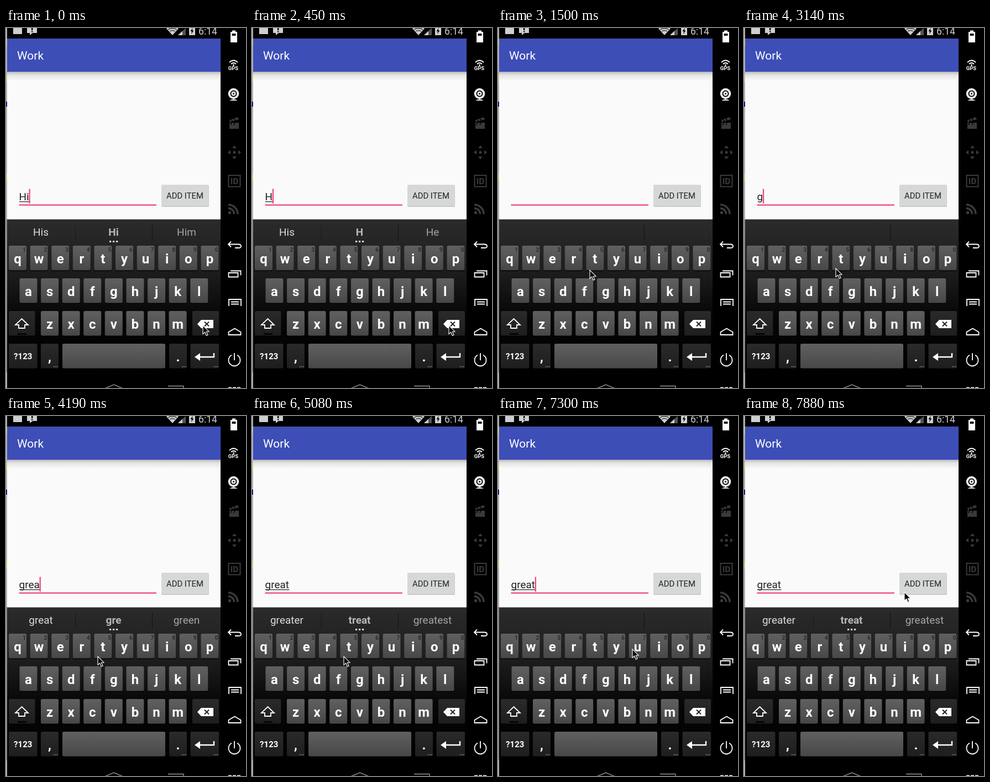
Animation, 434 px wide and 650 px high, one loop 8 s. Source, as an HTML page:

```html
<!DOCTYPE html>
<html lang="en">
<head>
<meta charset="utf-8">
<title>Phone keyboard</title>
<style>
  html, body { margin: 0; width: 100%; height: 100%; overflow: hidden; background: #000; }
  svg { display: block; width: 434px; height: 650px; }
  text { font-family: Roboto, sans-serif; }
  .mid { text-anchor: middle; }
  .bold { font-weight: 700; }
  .line { fill: none; stroke: #fff; stroke-width: 1.8; }
  .dim { fill: #3a3a3a; }
</style>
</head>
<body>
<svg viewBox="0 0 434 650">
  <defs>
    <linearGradient id="shade" x2="0" y2="1">
      <stop stop-color="#b9b9b9"/><stop offset=".35" stop-color="#e3e3e3"/><stop offset="1" stop-color="#fafafa"/>
    </linearGradient>
    <linearGradient id="board" x2="0" y2="1">
      <stop stop-color="#2b2b2b"/><stop offset=".35" stop-color="#1c1c1c"/><stop offset=".62" stop-color="#060606"/><stop offset="1" stop-color="#000"/>
    </linearGradient>
    <linearGradient id="light" x2="0" y2="1">
      <stop stop-color="#606060"/><stop offset=".5" stop-color="#545454"/><stop offset="1" stop-color="#474747"/>
    </linearGradient>
    <linearGradient id="dark" x2="0" y2="1">
      <stop stop-color="#2a2a2a"/><stop offset="1" stop-color="#1e1e1e"/>
    </linearGradient>
  </defs>

  <rect width="434" height="650"/>
  <g id="desktop">
    <rect width="2" height="650" fill="#b4b4b4"/>
    <path d="M0 19h2v14h-2zM0 84h2v14h-2zM0 262h2v14h-2z" fill="#c9c98c"/>
    <rect y="133" width="2" height="9" fill="#10108a"/>
    <rect y="345" width="2" height="277" fill="#8e8e8e"/>
  </g>

  <g id="status" fill="#cfcfcf">
    <rect x="2" width="386" height="19" fill="#000"/>
    <rect x="13" y="-5" width="16" height="16"/>
    <path d="M38 0H56V9H48L43 13V9H38Z"/>
    <path d="M46 0h2.4v4h-2.4zM46 5.5h2.4v2h-2.4z" fill="#000"/>
    <path d="M290 1Q301-6 312 1L301 13Z"/>
    <path d="M293 3Q301-2 309 3M296 6Q301 3 306 6" fill="none" stroke="#333" stroke-width="1.3"/>
    <path d="M311 13L325 0V13Z" fill="#555"/><path d="M311 13L319 5.5V13Z"/>
    <rect x="331" y="-3" width="11" height="16"/>
    <path d="M337.500 0L333.500 6H336L335 11L339.500 4.500H337Z" fill="#000"/>
    <text x="348" y="12" font-size="17.6">6:14</text>
  </g>

  <g id="app">
    <rect x="2" y="79" width="386" height="267" fill="#fafafa"/>
    <rect x="2" y="79" width="386" height="16" fill="url(#shade)"/>
    <rect x="2" y="19" width="386" height="60" fill="#3d4eb7"/>
    <text x="20" y="57" font-size="21" fill="#fff">Work</text>
    <rect x="281" y="284" width="86" height="39" rx="2" fill="#c4c5c5"/>
    <rect x="281" y="283" width="85.500" height="38.500" rx="2" fill="#d6d7d7"/>
    <text class="mid" x="323.500" y="308" font-size="14.9" fill="#222">ADD ITEM</text>
    <rect x="23.500" y="318.500" width="248.500" height="2.200" fill="#f0407f"/>
    <text id="entry" x="23.500" y="311" font-size="19" fill="#222"></text>
    <rect id="composing" x="24" y="313" height="1.200" fill="#222"/>
    <rect id="caret" width="2.200" fill="#f0407f"/>
  </g>

  <g id="keyboard">
    <rect x="2" y="345.500" width="386" height="283" fill="url(#board)"/>
    <path d="M264.500 356V384" stroke="#111"/>
    <path id="divider" d="M125.500 356V384" stroke="#191919"/>
    <g font-size="19" class="mid">
      <text class="hint" x="63" y="375" fill="#dcdcdc"></text>
      <text class="hint bold" x="194.500" y="375" fill="#b8b8b8"></text>
      <text class="hint" x="326.500" y="375" fill="#a6a6a6"></text>
    </g>
    <path id="more" d="M187 384h3.200v3h-3.200zM193 384h3.200v3h-3.200zM199 384h3.200v3h-3.200z" fill="#ddd"/>
    <g id="keys"></g>
    <g id="marks">
      <path class="line" d="M28.500 525L40 536H34V542H23V536H17Z"/>
      <path d="M21 552.500H37" stroke="#000" stroke-width="2.500"/>
      <path d="M346 534.500L353 527H375V542H353Z" fill="#fff"/>
      <path d="M359 530.500L367 538.500M367 530.500L359 538.500" stroke="#222" stroke-width="2"/>
      <path d="M376 587V594H349" fill="none" stroke="#fff" stroke-width="2.400"/>
      <path d="M341 594L351 587V601Z" fill="#fff"/>
    </g>
    <g class="line" style="stroke:#777">
      <path d="M176 652L195 644L214 652"/><path d="M293 646.500H321V652"/>
    </g>
  </g>

  <g id="tools">
    <rect x="388" width="46" height="650" fill="#000"/>
    <path d="M409 4.500H415V7H418V26H406V7H409Z" fill="#fff"/>
    <path d="M408.500 10H415.500V14H408.500Z" fill="#111"/>
    <path class="line" d="M404 62Q411.500 55 419 62M407 65Q411.500 61 416 65"/>
    <circle cx="411.500" cy="67" r="1.500" fill="#fff"/>
    <text class="mid bold" x="411" y="75.500" font-size="9.500" fill="#fff">GPS</text>
    <circle cx="411.500" cy="118.500" r="9.700" fill="#fff"/>
    <circle cx="411.500" cy="118.500" r="5" fill="none" stroke="#000" stroke-width="2"/>
    <circle cx="411.500" cy="118.500" r="1.600"/>
    <path d="M404 131Q411.500 126 419 131Z" fill="#fff"/>
    <g class="dim">
      <path d="M404 171H421V182H404ZM404 166L419 161L421 165L405 170Z"/>
      <path d="M407 165l3 4M412 163.500l3 4M408 171l-2 4M414 171l-2 4" stroke="#000" stroke-width="1.500"/>
      <path d="M413 212L417 217H409ZM413 237L417 232H409ZM401 224.500L406 220.500V228.500ZM425 224.500L420 220.500V228.500Z"/>
      <circle cx="413" cy="224.500" r="2.500"/>
      <rect x="402.500" y="266" width="21" height="20.500" fill="none" stroke="#3a3a3a" stroke-width="2"/>
      <text class="mid bold" x="413" y="282" font-size="15.500">ID</text>
      <circle cx="404.500" cy="333.500" r="2.700"/>
      <path d="M402 325.500A10.500 10.500 0 0 1 412.500 336M402 319A17 17 0 0 1 419 336" fill="none" stroke="#3a3a3a" stroke-width="3.600"/>
    </g>
    <g class="line">
      <path d="M407 385.500L402 390.500L407 395.500M402 390.500H420Q425 390.500 425 394T420 397H414"/>
      <path d="M402.500 442H419.500V449.500H402.500ZM406 438.500H424.500V446.500"/>
      <path d="M403 502V490H425V502M407 494.500H421M407 498.500H421"/>
      <path d="M402.500 554V549L413.500 542.500L424.500 549V554Z"/>
      <path d="M408 590.500A10.500 10.500 0 1 0 418 590.500M413 587V600"/>
    </g>
    <path d="M402 648.500h6v2h-6zM410 648.500h6v2h-6zM418 648.500h6v2h-6z" fill="#fff"/>
  </g>

  <path id="pointer" d="M0 0V15.500L3.700 12.200L6.300 18.300L9 17.200L6.400 11.200H11Z" fill="#0a0a0a" stroke="#fff" stroke-width="1.100"/>
</svg>

<script>
const $ = id => document.getElementById(id);
const LOOP = 8000;

// Keys: [label, x, width, dark?, hint]
function addKey(label, x, y, width, dark, size = 24, corner = '') {
  const fill = dark ? 'dark' : 'light';
  const mid = x + width / 2;
  const baseline = y + (size < 20 ? 28 : 32);
  const small = corner === '…'
    ? `<path d="M${x + width - 9} ${y + 41.500}h8" stroke="#999" stroke-width="1.500" stroke-dasharray="1.500"/>`
    : `<text class="mid bold" x="${x + width - 4}" y="${y + 11}" font-size="10.500" fill="#2c2c2c">${corner}</text>`;
  $('keys').insertAdjacentHTML('beforeend',
    `<rect x="${x}" y="${y + 1}" width="${width}" height="45" rx="2.500" fill="#000"/>
     <rect class="face" x="${x}" y="${y}" width="${width}" height="44.500" rx="2.500" fill="url(#${fill})"/>
     ${small}<text class="mid bold" x="${mid}" y="${baseline}" font-size="${size}" fill="#fff">${label}</text>`);
  return $('keys').querySelector('.face:last-of-type') && [...$('keys').querySelectorAll('.face')].pop();
}

function addRow(letters, x, y, numbered) {
  [...letters].forEach((c, i) =>
    addKey(c, x + i * 38.600, y, 32, false, 24, numbered ? String((i + 1) % 10) : ''));
}

addRow('qwertyuiop', 5, 393, true);
addRow('asdfghjkl', 24.500, 452);
addRow('zxcvbnm', 63, 511);
addKey('', 5, 511, 47.500, true);
const deleteKey = addKey('', 337, 511, 48, true);
addKey('?123', 5, 570, 51.500, true, 15);
addKey(',', 63, 570, 32, true, 24, '…');
addKey('', 102, 570, 186, false);
addKey('.', 295, 570, 32, true, 24, '…');
addKey('', 333.500, 570, 51.500, true, 24, '…');

// Each step lists only what changes from its time on.
const none = ['', '', ''];
const great = ['greater', 'treat', 'greatest'];
const steps = [
  [0, { text: 'Hi', hints: ['His', 'Hi', 'Him'], caret: 1, composing: 1, wrapped: 0, pressed: 0, at: [356, 537] }],
  [150, { text: 'H', pressed: 1 }],
  [300, { pressed: 0 }],
  [450, { hints: ['His', 'H', 'He'] }],
  [750, { text: '', pressed: 1 }],
  [900, { hints: none, pressed: 0 }],
  [1200, { at: [282, 484] }],
  [1350, { at: [182, 444], caret: 0 }],
  [1500, { at: [166, 437] }],
  [1650, { at: [166, 434] }],
  [1800, { caret: 1 }],
  [2400, { caret: 0 }],
  [2850, { caret: 1 }],
  [3140, { text: 'g', composing: 0 }],
  [3290, { text: 'gr', composing: 1 }],
  [3440, { hints: ['great', 'gr', 'green'] }],
  [3590, { text: 'gre', hints: ['great', 'gre', 'green'] }],
  [4190, { text: 'grea' }],
  [4340, { hints: ['great', 'grea', 'greater'] }],
  [4480, { text: 'great', hints: great }],
  [5080, { caret: 0 }],
  [5530, { caret: 1 }],
  [5670, { wrapped: 1, composing: 0, hints: none }],
  [6270, { caret: 0 }],
  [6410, { at: [205, 434] }],
  [6560, { at: [246, 431] }],
  [6710, { at: [243, 421], caret: 1 }],
  [7150, { caret: 0 }],
  [7300, { wrapped: 0, composing: 1, caret: 1 }],
  [7440, { hints: great, at: [251, 392] }],
  [7590, { at: [270, 350] }],
  [7730, { at: [286, 325] }],
  [7880, { at: [290, 318], caret: 0 }]
];

const hintTexts = document.querySelectorAll('.hint');
const set = (el, attrs) => Object.entries(attrs).forEach(([k, v]) => el.setAttribute(k, v));
const show = (el, on) => el.setAttribute('visibility', on ? 'visible' : 'hidden');

function render(time) {
  const s = Object.assign({}, ...steps.filter(([t]) => t <= time).map(([, change]) => change));
  const entry = $('entry');
  entry.textContent = s.text;
  entry.setAttribute('y', s.wrapped ? 289 : 311);
  const width = s.text ? entry.getComputedTextLength() : 0;
  const top = s.wrapped ? 293 : 290.500;
  set($('caret'), { x: 23.300 + (s.wrapped ? 0 : width), y: top, height: 317 - top });
  $('composing').setAttribute('width', width);
  show($('caret'), s.caret);
  show($('composing'), s.composing && s.text);
  hintTexts.forEach((el, i) => { el.textContent = s.hints[i]; });
  show($('more'), s.hints[1]);
  show($('divider'), s.hints[1]);
  deleteKey.setAttribute('fill', s.pressed ? '#5c5c5c' : 'url(#dark)');
  $('pointer').setAttribute('transform', `translate(${s.at})`);
}

const start = performance.now();
function tick() {
  render((performance.now() - start) % LOOP);
  requestAnimationFrame(tick);
}
tick();
</script>
</body>
</html>
```
